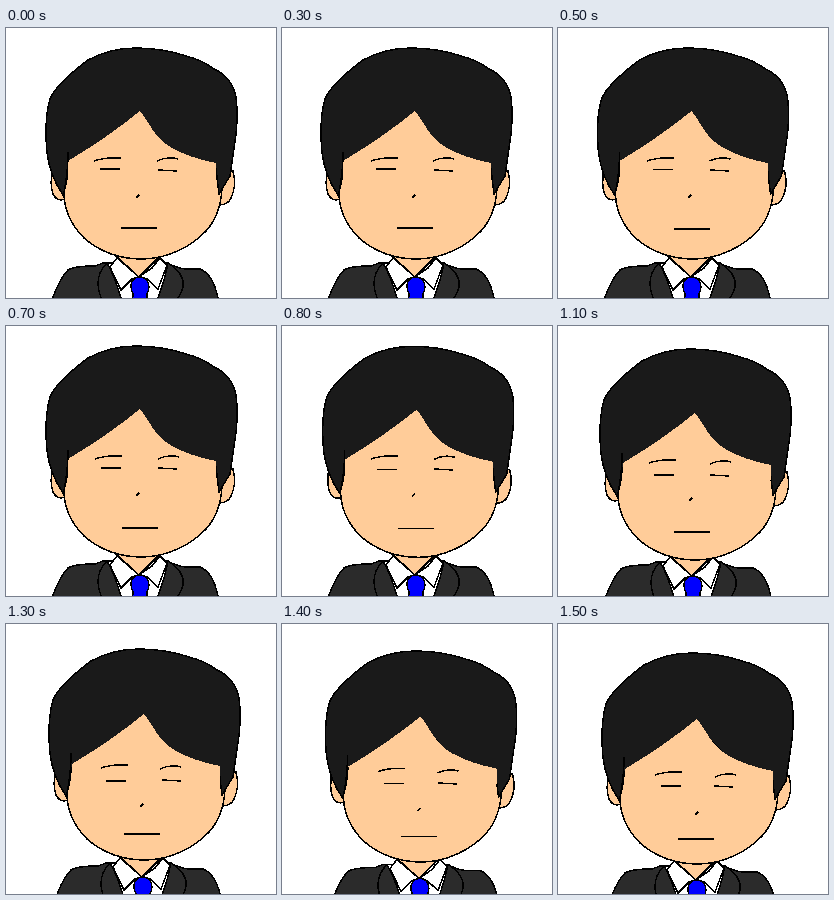
Recreate the animation shown at these times as an HTML page without scripts. Size 270 px wide and 270 px high, loop 2 s.

```html
<!DOCTYPE html>
<html lang="en">
<head>
<meta charset="utf-8">
<title>Nodding off</title>
<style>
  html, body { margin: 0; width: 100%; height: 100%; overflow: hidden; background: #fff; }
  svg { display: block; width: 100vw; height: 100vh; }
  .ink { stroke: #000; stroke-width: 1.5; fill: none; stroke-linejoin: round; shape-rendering: crispEdges; }
  .skin { fill: #fc9; }
  .hair { fill: #1a1a1a; }
  .suit { fill: #2b2b2b; }
  .shirt { fill: #fff; }
  .tie { fill: #00f; }

  /* Each part supplies its own offsets; the picture changes every 100 ms. */
  .part { animation: pose 2s infinite; }
  @keyframes pose {
    0%   { translate: 0px 0px;   animation-timing-function: steps(3); }
    15%  { translate: var(--b);  animation-timing-function: steps(4); }
    35%  { translate: var(--c);  animation-timing-function: steps(3); }
    50%  { translate: var(--d);  animation-timing-function: steps(1); }
    55%  { translate: var(--e);  animation-timing-function: steps(2); }
    65%  { translate: var(--f);  animation-timing-function: steps(2); }
    75%  { translate: var(--g);  animation-timing-function: steps(1); }
    100% { translate: 0px 0px; }
  }
  .body    { --b: 0px 0px;  --c: 0px 0px; --d: 0px 0px;  --e: 1px 1px; --f: 3px 4px;  --g: 5px 7px; }
  .head    { --b: -1px 0px; --c: 0px 0px; --d: 2px 1px;  --e: 2px 3px; --f: 3px 5px;  --g: 4px 9px; }
  .fringe  { --b: -1px 0px; --c: 0px 0px; --d: 2px 2px;  --e: 3px 4px; --f: 4px 7px;  --g: 5px 12px; }
  .brow-l  { --b: 1px 0px;  --c: 1px 0px; --d: 1px 0px;  --e: 3px 4px; --f: 7px 11px; --g: 9px 18px; }
  .brow-r  { --b: 0px 0px;  --c: 1px 0px; --d: 1px 1px;  --e: 1px 5px; --f: 3px 12px; --g: 6px 20px; }
  .eye-l   { --b: 0px 0px;  --c: 1px 1px; --d: 1px 5px;  --e: 2px 8px; --f: 6px 16px; --g: 9px 21px; }
  .eye-r   { --b: 0px 0px;  --c: 0px 0px; --d: 0px 3px;  --e: 0px 7px; --f: 4px 14px; --g: 4px 20px; }
  .nose    { --b: 0px 0px;  --c: 0px 0px; --d: -1px 2px; --e: 1px 5px; --f: 4px 13px; --g: 7px 21px; }
  .mouth   { --b: 0px 0px;  --c: 1px 2px; --d: 1px 4px;  --e: 1px 6px; --f: 3px 10px; --g: 5px 15px; }
</style>
</head>
<body>
<svg viewBox="0 0 270 270">
  <g class="ink">
    <g class="part body">
      <path class="shirt" d="M101 235V280H160V235Z"/>
      <path class="skin" d="M110 228L133 249L154 228Z"/>
      <path class="suit" d="M46 280L47 269Q54 250 62 242Q68 238 89 238L97 235H101Q109 248 118 280Z"/>
      <path class="suit" d="M162 235Q170 240 180 241L194 241Q207 246 212 270V280H148Q158 256 162 235Z"/>
      <path d="M101 235Q86 250 96 272M162 235Q186 250 172 270"/>
      <path class="shirt" d="M111 230L104 239L115 262L126 251L133 249Z"/>
      <path class="shirt" d="M154 230L161 237L152 261L141 251L133 249L146 240Z"/>
      <path class="tie" d="M134 249C125 249 123 258 127 266L126 280H142L141 266C145 258 142 249 134 249Z"/>
    </g>

    <g class="part head">
      <path class="skin" d="M46 142Q44 158 47 166Q51 174 59 171V145Z"/>
      <path class="skin" d="M227 143Q231 158 225 170Q222 177 213 177V145Z"/>
      <path class="skin" d="M61 120L58 161C57 181 64 196 78 210C93 223 113 231 136 231C161 231 185 219 200 203C210 192 215 177 216 161L213 120Z"/>
      <path class="hair" d="M57 167Q44 148 41 125Q38 92 44 71Q50 56 82 32Q104 20 130 20T180 28Q196 32 208 41Q226 49 230 69Q233 92 228 120L224 148L213 166L210 141L170 130L134 91L62 139Q62 152 57 167Z"/>
    </g>
  </g>

  <path class="part fringe skin" shape-rendering="crispEdges" d="M62 133Q102 109 134 83C144 95 148 110 166 120Q184 130 210 135V150H62Z"/>

  <g class="ink">
    <path class="part head" d="M62 124Q62 145 58 164"/>
    <path class="part brow-l" d="M88 133Q100 129 115 130"/>
    <path class="part brow-r" d="M151 133Q161 128 172 131"/>
    <path class="part eye-l" d="M94 141H114"/>
    <path class="part eye-r" d="M152 142L171 143"/>
    <path class="part nose" d="M130 170L133 167"/>
    <path class="part mouth" d="M115 200H151"/>
  </g>
</svg>
</body>
</html>
```
